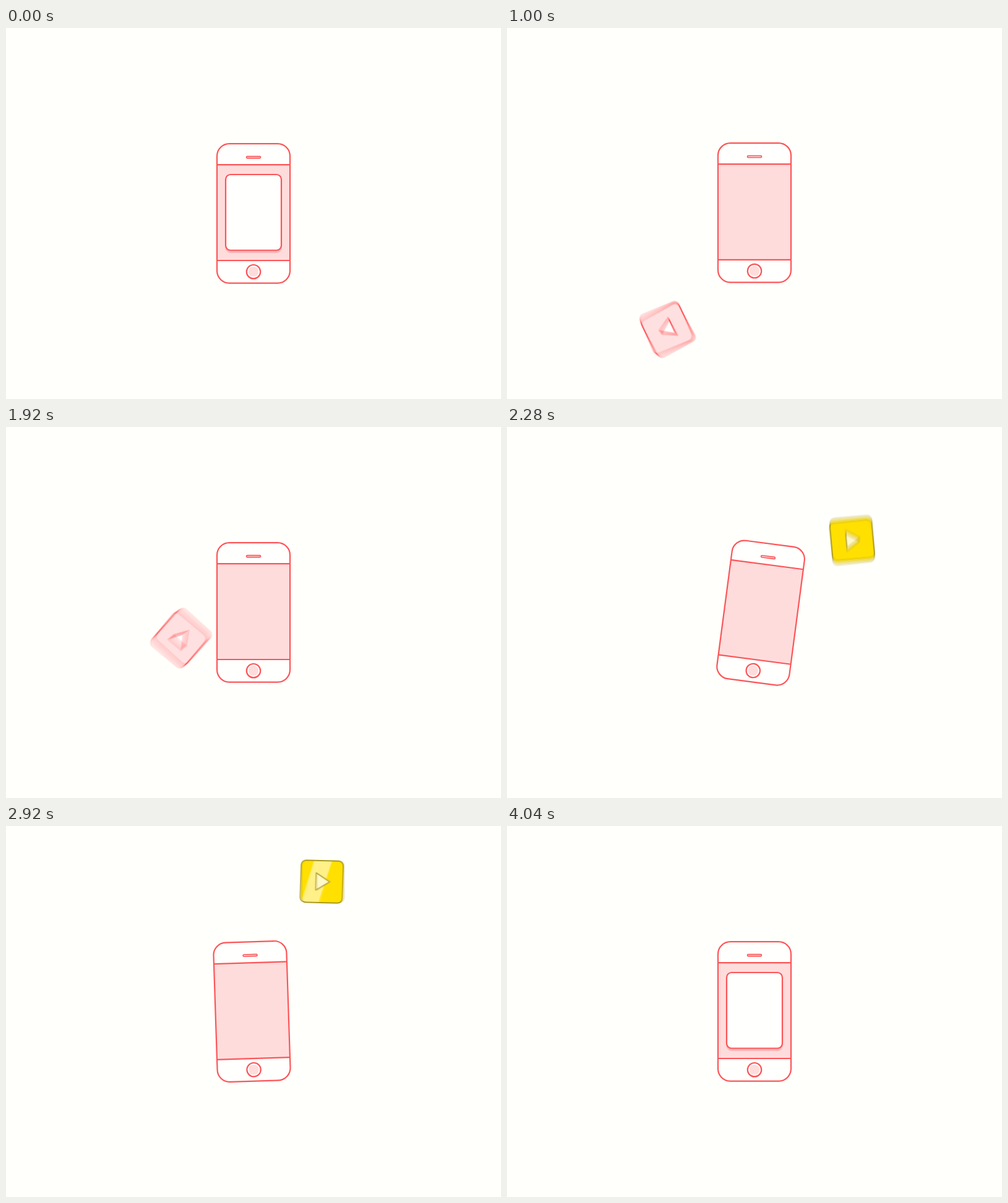
Animation of 800 by 600 pixels, one loop 4480 ms. Source, as an HTML page:

```html
<!DOCTYPE html>
<html lang="en">
<head>
<meta charset="utf-8">
<title>Phone and play tile</title>
<style>
  html, body { margin: 0; width: 100%; height: 100%; overflow: hidden; background: #fffffc; }
  svg { display: block; width: 100vw; height: 100vh; }
  .line { stroke: #fc5557; stroke-width: 2.2; }
  .pink { fill: #ffdcdc; }
  .white { fill: #fffffd; }
  .none { fill: none; }
  #blur { isolation: isolate; }
  #blur use { mix-blend-mode: plus-lighter; }
</style>
</head>
<body>
<svg viewBox="0 0 800 600" xmlns="http://www.w3.org/2000/svg">
  <defs>
    <clipPath id="screen"><rect x="341" y="221" width="118" height="155"/></clipPath>
    <rect id="face" x="-34" y="-34" width="68" height="68" rx="8"/>
    <clipPath id="faceClip"><use href="#face"/></clipPath>
    <path id="play" d="M-9.5-14L12.5 0L-9.5 14Z" stroke-linejoin="round"/>
    <g id="pinkTile">
      <use href="#face" class="pink line"/>
      <use href="#play" class="white line"/>
    </g>
    <g id="goldTile">
      <use href="#face" fill="#fedd00"/>
      <g clip-path="url(#faceClip)">
        <path id="shine" d="M-13-36H16L-5 36H-33Z" fill="#ffee82"/>
      </g>
      <use href="#face" fill="none" stroke="#a89518" stroke-width="2"/>
      <use href="#play" fill="#fff6c4" stroke="#b5a53c" stroke-width="2"/>
    </g>
  </defs>
  <rect width="800" height="600" fill="#fffffc"/>
  <g id="blur"></g>
  <g id="phone">
    <rect class="white" x="341" y="187.2" width="118" height="225.4" rx="20"/>
    <rect class="pink" x="341" y="221" width="118" height="155"/>
    <g clip-path="url(#screen)">
      <g id="card">
        <rect x="354" y="240" width="92" height="124" rx="9" fill="#ffb9bb"/>
        <rect class="white line" x="355" y="237" width="90" height="122.5" rx="8"/>
      </g>
    </g>
    <path class="line" d="M341 221.2H459M341 376H459"/>
    <rect class="none line" x="341" y="187.2" width="118" height="225.4" rx="20"/>
    <rect class="pink line" style="stroke-width:1.6" x="388.5" y="207.6" width="23" height="3" rx="1.5"/>
    <circle class="white line" cx="400" cy="394.2" r="11.2"/>
    <circle class="pink" cx="400" cy="394.2" r="8.2"/>
  </g>
</svg>
<script>
const LOOP = 4480, STEP = 40, SHUTTER = 22, SAMPLES = 8;
const get = id => document.getElementById(id);

const smooth = u => u * u * (3 - 2 * u);
const easeIn = power => u => u ** power;
const easeOut = power => u => 1 - (1 - u) ** power;
const progress = (t, from, to) => Math.min(1, Math.max(0, (t - from) / (to - from)));
const ramp = (t, from, to) => smooth(progress(t, from, to));
const mix = (a, b, u) => a + (b - a) * u;

const bezier = (a, b, c, d, u) => {
  const v = 1 - u;
  return v * v * v * a + 3 * u * v * v * b + 3 * u * u * v * c + u * u * u * d;
};

// Phone: crouch up, thrust down, rebound
const phoneLift = t => -26 * ramp(t, 0, 240) + 59 * ramp(t, 240, 500)
  - 37 * ramp(t, 500, 820) + 4 * ramp(t, 820, 1100);

// Phone: knocked over by the passing tile, swings back past upright
const phoneTilt = t => 7.8 * ramp(t, 1960, 2210) - 9.7 * ramp(t, 2210, 2890)
  + 1.9 * ramp(t, 2890, 3280);

// Card: leaves through the bottom, later drops in from the top and settles
const cardSlide = t => t < 2000
  ? 146 * ramp(t, 200, 480)
  : -146 + 153 * ramp(t, 3360, 3640) - 7 * ramp(t, 3640, 4000);

// Tile flight: each leg starts where the previous one ended
const flight = [];
let here = { time: 560, at: [400, 400], turn: 6 };
function fly(time, ease, out, into, at, turn) {
  const next = { time, at, turn };
  flight.push({ from: here, to: next, out, into, ease });
  here = next;
}
fly(1320, easeOut(1.6), [404, 558], [232, 558], [232, 395], 262);
fly(1560, smooth, [232, 404], [232, 413], [231.5, 422], 267);
fly(2280, easeIn(2), [232, 300], [558, 243], [558, 183], 355);
fly(2920, easeOut(2), [558, 130], [515, 90], [510, 90], 362);
fly(3342, easeIn(1.2), [600, 90], [380, 20], [400, 230], 268);

function tilePose(t) {
  const { from, to, out, into, ease } = flight.find(leg => t < leg.to.time) || flight.at(-1);
  const u = progress(t, from.time, to.time);
  const [x, y] = [0, 1].map(i => bezier(from.at[i], out[i], into[i], to.at[i], ease(u)));
  return `translate(${x} ${y}) rotate(${mix(from.turn, to.turn, u)})`;
}

// Additive copies spread over the shutter time give the motion blur
const copies = Array.from({ length: SAMPLES }, () => {
  const copy = document.createElementNS("http://www.w3.org/2000/svg", "use");
  copy.setAttribute("opacity", 1 / SAMPLES);
  return get("blur").appendChild(copy);
});

function draw(t) {
  get("phone").setAttribute("transform",
    `translate(0 ${phoneLift(t)}) rotate(${phoneTilt(t)} 400 377)`);
  get("card").setAttribute("transform", `translate(0 ${cardSlide(t)})`);
  get("shine").setAttribute("transform", `translate(${(t - 2920) * 0.45} 0)`);
  get("blur").style.display = t >= 560 && t < 3360 ? "" : "none";
  copies.forEach((copy, i) => {
    copy.setAttribute("href", t < 2080 ? "#pinkTile" : "#goldTile");
    copy.setAttribute("transform", tilePose(t + SHUTTER * ((i + 0.5) / SAMPLES - 0.5)));
  });
}

const start = performance.now();
function tick() {
  const t = (performance.now() - start) % LOOP;
  draw(Math.floor(t / STEP) * STEP);
  requestAnimationFrame(tick);
}
draw(0);
requestAnimationFrame(tick);
</script>
</body>
</html>
```
